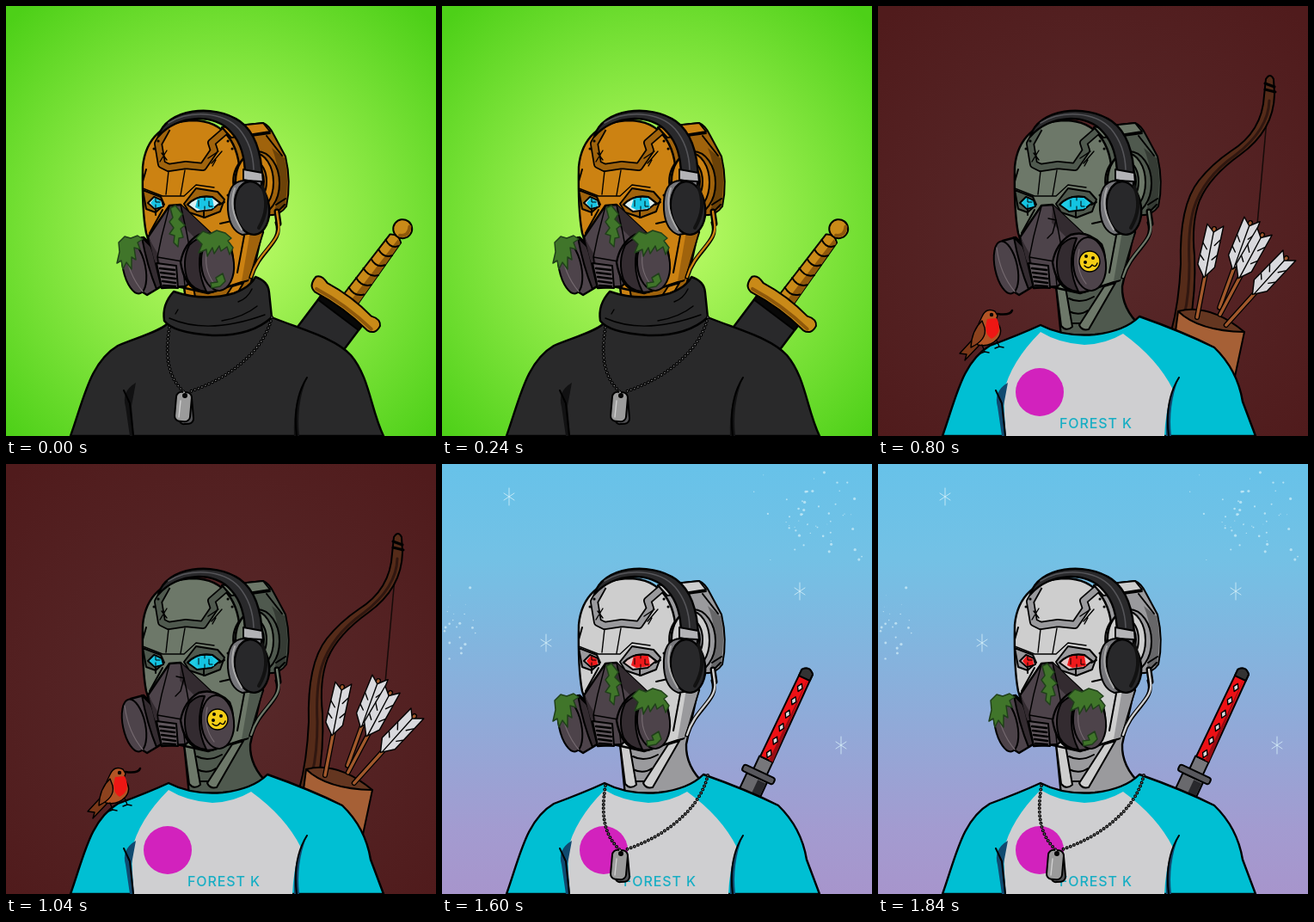
An HTML page that plays this animation: 500x500 px, repeating every 2000 ms.

```html
<!DOCTYPE html>
<html lang="en">
<head>
<meta charset="utf-8">
<title>Masked robots</title>
<style>
html, body { margin: 0; width: 100%; height: 100%; overflow: hidden; }
svg { display: block; width: 100%; height: 100%; }
#art { stroke: #000; stroke-width: 2; stroke-linejoin: round; stroke-linecap: round; fill: none; }
.skin { fill: var(--skin); }
.shade { fill: var(--shade); }
.cloth { fill: var(--cloth); }
.fold { fill: var(--fold); stroke: none; }
.black { fill: #080808; }
.gold { fill: #c98a18; }
.brass { fill: #8f590b; }
.rubber { fill: #4d434a; }
.dark { fill: #332b30; }
.moss { fill: #40752a; stroke: #20401a; stroke-width: 1.5; }
.steel { fill: #9b9b9b; }
.thin { stroke-width: 1.4; }
.bold { stroke-width: 2.4; }
</style>
</head>
<body>
<svg viewBox="0 0 500 500">
<defs>
  <radialGradient id="glow" gradientUnits="userSpaceOnUse" cx="250" cy="260" r="345">
    <stop offset="0" stop-color="var(--inner)"/>
    <stop offset="1" stop-color="var(--outer)"/>
  </radialGradient>
  <linearGradient id="dusk" x2="0" y2="1">
    <stop offset="0" stop-color="#67c2e9"/>
    <stop offset=".22" stop-color="#73c1e5"/>
    <stop offset=".85" stop-color="#a39bd0"/>
    <stop offset="1" stop-color="#a795cc"/>
  </linearGradient>
  <g id="arrow">
    <path d="M0 0V105" stroke-width="6"/>
    <path d="M0 0V105" stroke="#a2592c" stroke-width="3.4"/>
    <path d="M0 4L-9 -4L-11 44L-1 58L9 44L10 -5Z" fill="#d9d9dd" class="thin"/>
    <path d="M0 4V56M-10 18L-4 25M-10 33L-5 38M9 12L4 19M9 30L4 36" class="thin"/>
  </g>
</defs>
<rect width="500" height="500" fill="url(#glow)"/>

<g id="art">
  <g data-part="sky">
    <rect width="500" height="500" fill="url(#dusk)" stroke="none"/>
    <g id="stars" stroke="none" fill="#d8f2fa"></g>
  </g>

  <g data-part="sword" transform="translate(395 347) rotate(37)">
    <path d="M-29 5H30V75H-29Z" fill="#29292b" class="bold"/>
    <path d="M-29 5H30V15H-29Z" class="black"/>
    <path d="M-9 -7L-8 -96Q0 -103 8 -96L11 -7Z" class="gold"/>
    <path d="M3 -97L8 -95L11 -8H2Z" class="brass" stroke="none"/>
    <path d="M-9 -18Q3 -13 10 -22M-9 -32Q3 -27 10 -36M-9 -46Q3 -41 10 -50M-8 -60Q3 -55 9 -64M-8 -74Q3 -69 9 -78M-8 -88Q3 -83 8 -91"/>
    <circle cy="-110" r="11" class="gold"/>
    <path d="M5 -117Q11 -107 2 -102" stroke="#8f590b" stroke-width="4"/>
    <path d="M-47 -5Q-43 -11 -32 -7Q0 -12 32 -7Q43 -11 47 -4Q49 8 38 9Q0 4 -37 10Q-48 9 -47 -5Z" class="gold"/>
    <path d="M-38 6Q0 0 41 5" stroke="#8f590b" stroke-width="4"/>
  </g>

  <g data-part="katana" transform="translate(368 361) rotate(25)">
    <path d="M-13 4H13V42H-13Z" fill="#69696d"/>
    <path d="M2 6H12V40H2Z" fill="#29292d" stroke="none"/>
    <path d="M-8 -20H9V0H-8Z" fill="#77777b"/>
    <path d="M-7 -20L-6 -132Q1 -140 8 -132L9 -20Z" fill="#ee1015"/>
    <path d="M5 -128L9 -20H4Z" fill="#980c13" stroke="none"/>
    <path d="M-6 -124L-6 -132Q1 -140 8 -132V-124Z" fill="#333"/>
    <g id="diamonds" fill="#ddd" class="thin"></g>
    <rect x="-20" y="-4" width="40" height="8" rx="3" fill="#58585d"/>
  </g>

  <g data-part="archery">
    <path d="M455 100L440 265" stroke="#160b09" stroke-width="1.5"/>
    <path d="M451 85Q456 77 460 85L461 103Q460 145 421 173Q386 198 374 226Q364 252 368 290Q370 330 362 375L341 378Q350 345 352 300Q350 232 373 203Q388 184 410 169Q447 146 449 104Z" fill="#552b19"/>
    <path d="M455 110Q454 144 416 173Q378 200 367 236Q360 262 362 300Q362 335 356 360" stroke="#311710" stroke-width="3"/>
    <path d="M450 90L461 94M450 97L462 100" stroke-width="3"/>
    <path d="M349 355Q385 345 426 379Q380 390 349 355Z" fill="#643620"/>
    <use href="#arrow" transform="translate(391 259) rotate(11)"/>
    <use href="#arrow" transform="translate(433 252) rotate(20)"/>
    <use href="#arrow" transform="translate(447 266) rotate(28)"/>
    <use href="#arrow" transform="translate(475 293) rotate(42)"/>
    <path d="M349 355Q373 378 426 379L413 440H338Z" fill="#a66036"/>
  </g>

  <g data-part="hoodie">
    <path d="M282 338Q340 341 372 354Q416 374 420 410V440H250Z" class="cloth bold"/>
    <path d="M376 385Q404 388 418 412V436L400 410Z" class="fold"/>
    <path d="M282 338Q322 343 349 364L300 386Z" class="black"/>
  </g>

  <!-- neck and head -->
  <path d="M206 315L213 385L236 416L306 373Q283 352 284 326L298 262Z" class="shade bold"/>
  <path d="M222 340Q235 347 251 338M222 355Q234 361 244 354M223 369H240"/>
  <path d="M207 325L218 327L226 373Q219 379 213 372ZM263 326L276 322L245 376Q237 378 234 371Z" class="skin"/>
  <path d="M251 141L299 136Q306 139 311 149L325 175Q332 205 326 233Q318 245 301 243L275 231Z" class="shade"/>
  <path d="M251 141L299 136L307 146L262 153ZM270 153L307 148M303 151L321 174M314 231L325 224M317 238L324 231" class="skin"/>
  <path d="M309 165Q323 198 312 239L324 234Q330 202 324 177Z" fill="#0005" stroke="none"/>
  <path d="M163 264Q158 238 159 187C162 154 184 133 219 133C252 134 272 158 272 200L270 218L292 244L299 263L281 319L235 334L181 322Z" class="skin bold"/>
  <path d="M291 243L298 263L282 318L274 320L284 262Z" class="shade" stroke="none"/>
  <path d="M249 253L267 249L270 262L277 267L269 310M163 190L159 204M270 184Q260 200 267 218M182 237L167 264"/>
  <path d="M187 142L177 160L181 184L189 188L209 185L229 187L242 168L239 159L254 146" stroke-width="10" stroke-linecap="butt"/>
  <path d="M187 142L177 160L181 184L189 188L209 185L229 187L242 168L239 159L254 146" stroke="var(--shade)" stroke-width="6.5" stroke-linecap="butt"/>
  <path d="M189 192L186 219M208 191L203 220M159 212L182 221H207L221 208L242 211" class="thin"/>
  <path d="M159 214L180 222L184 231L174 240L163 236ZM207 230L221 212L246 216L254 225L249 239L231 246L213 240Z" class="shade"/>
  <path d="M165 229L172 222L181 226L183 233L173 236ZM211 231Q222 219 240 222L249 229L239 237L222 239Z" fill="var(--white)"/>
  <path d="M168 229L173 223L180 227L181 233L173 235ZM220 234L223 223L240 223L242 235L226 237Z" fill="var(--eye)" stroke="none"/>
  <path d="M174 223V228H179M174 235V231M231 222V226M231 237V233M224 226V233M236 227V233H240" stroke-width="1"/>
  <path d="M211 231Q222 219 240 222L249 229M174 237V243M230 239V246M248 231L254 228"/>
  <path d="M235 177L247 169M239 183L251 169M240 186L244 179M179 181L187 168M181 171L187 179" class="thin"/>
  <path d="M258 157h.1M263 166h.1M258 220h.1M264 221h.1M177 157h.1M172 166h.1" stroke-width="3"/>
  <ellipse cx="292" cy="206" rx="26" ry="37" class="shade"/>
  <ellipse cx="289" cy="205" rx="22" ry="34" class="skin"/>
  <ellipse cx="291" cy="204" rx="12" ry="22" class="shade"/>
  <path d="M292 184Q304 204 291 225Q300 215 300 204T292 184Z" fill="#0007"/>
  <path d="M315 239L317 253" stroke-width="7"/>
  <path d="M315 252C323 274 294 284 285 315" stroke-width="5"/>
  <path d="M315 239L317 253C321 274 294 284 285 315" stroke="var(--skin)" stroke-width="2.4"/>

  <!-- clothes -->
  <g data-part="turtleneck">
    <path d="M75 500C91 455 98 414 130 395C154 385 177 379 187 370L309 362C346 377 382 386 401 406C423 432 424 469 439 500Z" class="cloth bold"/>
    <path d="M195 332Q230 344 265 334Q284 327 290 315Q305 320 306 333L309 362Q285 384 240 383Q194 380 184 366Q181 347 195 332Z" class="cloth bold"/>
    <path d="M190 363Q235 383 301 359M200 353L197 358M286 329Q281 340 270 344M292 349Q276 362 251 366" class="thin"/>
  </g>
  <g data-part="hoodie">
    <path d="M75 500C90 454 99 416 130 396Q148 387 168 384L236 417L365 385Q400 393 414 426Q428 462 439 500Z" class="cloth bold"/>
    <path d="M170 387Q196 422 235 433Q284 425 337 399Q287 438 235 440Q186 432 170 387Z" class="fold"/>
    <path d="M207 347Q178 363 166 380Q176 411 233 432Q283 421 325 398Q354 388 377 387Q366 375 346 363Q321 365 304 374L235 414Q211 391 207 347Z" class="cloth bold"/>
    <path d="M215 417Q222 438 216 459L215 476L222 489M242 416Q249 437 246 458L254 494" stroke-width="6"/>
    <path d="M215 417Q222 438 216 459L215 476L222 489M242 416Q249 437 246 458L254 494" stroke="var(--cloth)" stroke-width="2.6"/>
    <path d="M213 417h3M241 416h3" stroke-width="5"/>
  </g>
  <g data-part="shirt">
    <path d="M75 500C91 455 98 414 130 395Q165 382 189 371Q216 385 252 382Q287 378 304 361Q355 379 391 397Q418 423 424 460L439 500Z" class="cloth bold"/>
    <path d="M189 379Q154 414 146 450L148 500H333Q334 472 343 446Q325 410 285 381Q265 393 240 394Q210 392 189 379Z" fill="#cfcfd1" stroke="none"/>
    <circle cx="188" cy="449" r="28" fill="#d222bd" stroke="none"/>
    <text x="211" y="491" fill="#17aec4" stroke="none" font-family="Inter, sans-serif" font-size="16" font-weight="500" letter-spacing=".9">FOREST K</text>
  </g>
  <path d="M151 438Q134 448 139 466L144 500H149L146 465ZM350 432Q333 459 335 500H341Q337 465 350 432Z" class="fold"/>
  <path d="M137 447L144 462L148 500M350 432Q333 459 338 500"/>

  <g data-part="bird" class="thin">
    <path d="M119 378L95 404L103 405L101 412L122 390Z" fill="#7b3818"/>
    <path d="M139 358Q154 360 156 354" stroke-width="2.5"/>
    <path d="M121 361Q126 350 136 355L139 360L137 366Q147 377 139 387Q130 397 116 394Q107 389 121 361Z" fill="#b35425"/>
    <path d="M127 364L138 363Q146 380 132 387Q122 381 127 364Z" fill="#ee1714" stroke="none"/>
    <path d="M121 366Q109 377 108 397Q127 388 124 374Z" fill="#8c421e"/>
    <path d="M121 394L124 402L129 403M124 402L119 404M138 389L141 396L146 397M141 396L136 398"/>
    <circle cx="132" cy="359" r="1.5" class="black"/>
  </g>

  <g data-part="headphones">
    <path d="M177 152C186 119 242 113 272 134Q297 152 298 202L278 198Q278 164 262 147C243 124 199 126 177 152Z" fill="#29292b" class="bold"/>
    <path d="M189 136C213 121 252 122 271 143Q287 162 288 190" stroke="#555559" stroke-width="1.6"/>
    <path d="M276 190L298 194L299 206L276 202Z" fill="#b3b3b6"/>
    <path d="M278 203Q256 203 258 237Q260 261 275 266L293 263L297 204Z" fill="#77777b"/>
    <ellipse cx="286" cy="235" rx="20" ry="31" transform="rotate(-7 286 235)" fill="#28282a" class="bold"/>
    <path d="M266 212Q258 235 274 260" stroke="#aaa"/>
    <path d="M298 210Q308 234 294 258" stroke="#111" stroke-width="4"/>
  </g>

  <g data-part="cap">
    <path d="M178 144C186 109 227 102 261 109C304 116 328 152 330 207Q292 209 260 203L181 160Z" fill="#fa0505" class="bold"/>
    <path d="M249 108C282 111 305 124 319 153Q329 177 330 207L291 206C302 160 284 120 249 108Z" fill="#850306" class="thin"/>
    <path d="M114 194Q116 158 142 150C180 144 207 138 230 154Q254 172 262 204Q226 199 203 185Q184 167 166 166L160 190Q135 201 114 194Z" fill="#fa0505" class="bold"/>
    <path d="M115 194Q123 168 147 161Q156 160 167 166L160 190Q138 199 115 194Z" fill="#920307" class="thin"/>
    <path d="M240 107Q246 104 252 108" stroke-width="4"/>
  </g>

  <!-- respirator -->
  <path d="M145 273L160 269Q174 280 184 324L164 336Q146 327 135 290Z" class="rubber bold"/>
  <path d="M158 269Q164 302 175 329L184 323L171 282Z" class="dark"/>
  <ellipse cx="149" cy="304" rx="13" ry="31" transform="rotate(-12 149 304)" class="rubber"/>
  <path d="M138 281Q142 312 159 332" stroke="#756a70" stroke-width="1.2"/>
  <path d="M190 232L203 231L238 264L231 303L209 326L181 328L171 286L165 269Z" class="rubber bold"/>
  <path d="M203 231L238 264L225 275L202 252ZM166 270L177 289L184 328L172 294Z" class="dark" stroke="none"/>
  <path d="M190 233L181 268L176 292L205 297L214 285L210 263L203 231M176 292L181 327M205 297L208 325" class="thin"/>
  <path d="M175 299L198 302L200 328L181 327Z" fill="#60575d"/>
  <path d="M179 305L196 307M180 310L196 312M181 315L197 317M182 320L197 322M183 325L197 326" stroke-width="2.5"/>
  <path d="M224 266Q243 260 260 277Q270 301 255 325Q240 338 221 330Q207 323 203 298Q207 276 224 266Z" class="rubber bold"/>
  <path d="M213 278Q223 268 231 270Q218 302 233 332Q218 331 211 318Q204 297 213 278Z" class="dark"/>
  <ellipse cx="246" cy="300" rx="19" ry="31" transform="rotate(-5 246 300)" class="rubber"/>
  <path d="M234 283Q229 306 242 323" stroke="#756a70" stroke-width="1.2"/>
  <g data-part="smiley">
    <path d="M198 247L207 249L203 264L197 270" class="thin"/>
    <circle cx="246" cy="297" r="12" fill="#f5ce16" class="thin"/>
    <path d="M242 291v.1M250 293v.1M241 298v.1" stroke-width="4"/>
    <path d="M240 302Q245 307 249 301Q253 305 255 299" class="thin"/>
  </g>
  <g data-part="moss" class="moss">
    <path d="M131 275L138 268L145 270L153 267L159 271L153 275L156 283L149 281L151 295L146 292L146 306L140 298L136 306L134 296L129 299L132 286Z"/>
    <path d="M191 235L197 232L205 242L201 248L208 255L203 259L206 269L201 270L200 280L195 275L196 267L190 265L195 258L190 251L194 246Z"/>
    <path d="M221 270L229 262L237 265L245 261L255 264L262 270L258 273L264 281L260 289L257 280L250 285L248 279L242 288L240 281L234 291L233 283L224 287L228 277Z"/>
    <path d="M244 316L252 311L255 320L249 326L239 328L238 322L246 321Z"/>
  </g>

  <g data-part="tags">
    <g stroke-dasharray="0 4.4">
      <path d="M190 374C184 412 190 433 207 449M309 362C300 402 258 434 212 449" stroke-width="4"/>
      <path d="M190 374C184 412 190 433 207 449M309 362C300 402 258 434 212 449" stroke="#888" stroke-width="1.6"/>
    </g>
    <rect x="200" y="451" width="17" height="35" rx="6" transform="rotate(-5 208 468)" fill="#535356"/>
    <rect x="197" y="449" width="18" height="34" rx="6" transform="rotate(5 206 466)" class="steel"/>
    <path d="M207 449V455M203 459L201 478" stroke="#d0d0d0" class="thin"/>
    <circle cx="208" cy="453" r="2" class="black"/>
  </g>
</g>
</svg>
<script>
const FRAME = 400;
const gold = { skin: '#cc8212', shade: '#a0630c', white: '#dceff0', eye: '#18c5e5' };
const green = { skin: '#6d7869', shade: '#4f594e', white: '#21cce5', eye: '#13c4e2' };
const silver = { skin: '#cecece', shade: '#9a9a9d', white: '#e5c5c5', eye: '#f0191b' };
const looks = [
  { ...gold, inner: '#c5ff6d', outer: '#4dd018', cloth: '#29292a', fold: '#111112',
    parts: 'sword turtleneck headphones moss tags' },
  { ...green, inner: '#b681cb', outer: '#873fa7', cloth: '#fb0305', fold: '#a50308',
    parts: 'sword hoodie moss tags' },
  { ...green, inner: '#582a2b', outer: '#501b1c', cloth: '#00bfd3', fold: '#104a70',
    parts: 'archery shirt bird headphones smiley' },
  { ...gold, inner: '#383d95', outer: '#101241', cloth: '#0348fb', fold: '#062a9b',
    parts: 'sword hoodie cap moss' },
  { ...silver, inner: '#8baedb', outer: '#8baedb', cloth: '#00bfd3', fold: '#104a70',
    parts: 'sky katana shirt headphones moss tags' }
];

const parts = document.querySelectorAll('[data-part]');
const root = document.documentElement;

// Seeded specks and four sparkles for the evening sky.
let seed = 7;
const random = () => (seed = seed * 16807 % 2147483647) / 2147483647;
let sky = '';
for (let i = 0; i < 75; i++) {
  const right = i < 52;
  const x = (right ? 430 : 12) + (random() + random() - 1) * (right ? 68 : 35);
  const y = (right ? 63 : 182) + (random() + random() - 1) * 62;
  sky += `<circle cx="${x}" cy="${y}" r="${.4 + random() * 1.3}" opacity=".65"/>`;
}
for (const [x, y] of [[78, 38], [416, 148], [464, 327], [121, 208]])
  sky += `<path transform="translate(${x} ${y})" d="M0 -10V10M-6 -4L6 4M-6 4L6 -4" stroke="#d8f2fa" stroke-width=".8"/>`;
document.getElementById('stars').innerHTML = sky;

let diamonds = '';
for (let y = -112; y < -20; y += 17) diamonds += `<path d="M1 ${y - 5}l3 5l-3 5l-3 -5Z"/>`;
document.getElementById('diamonds').innerHTML = diamonds;

let shown = -1;
function draw() {
  const index = Math.floor(performance.now() / FRAME) % looks.length;
  if (index !== shown) {
    shown = index;
    const { parts: names, ...colors } = looks[index];
    for (const key in colors) root.style.setProperty('--' + key, colors[key]);
    const visible = names.split(' ');
    for (const part of parts) part.style.display = visible.includes(part.dataset.part) ? '' : 'none';
  }
  requestAnimationFrame(draw);
}
draw();
</script>
</body>
</html>
```
